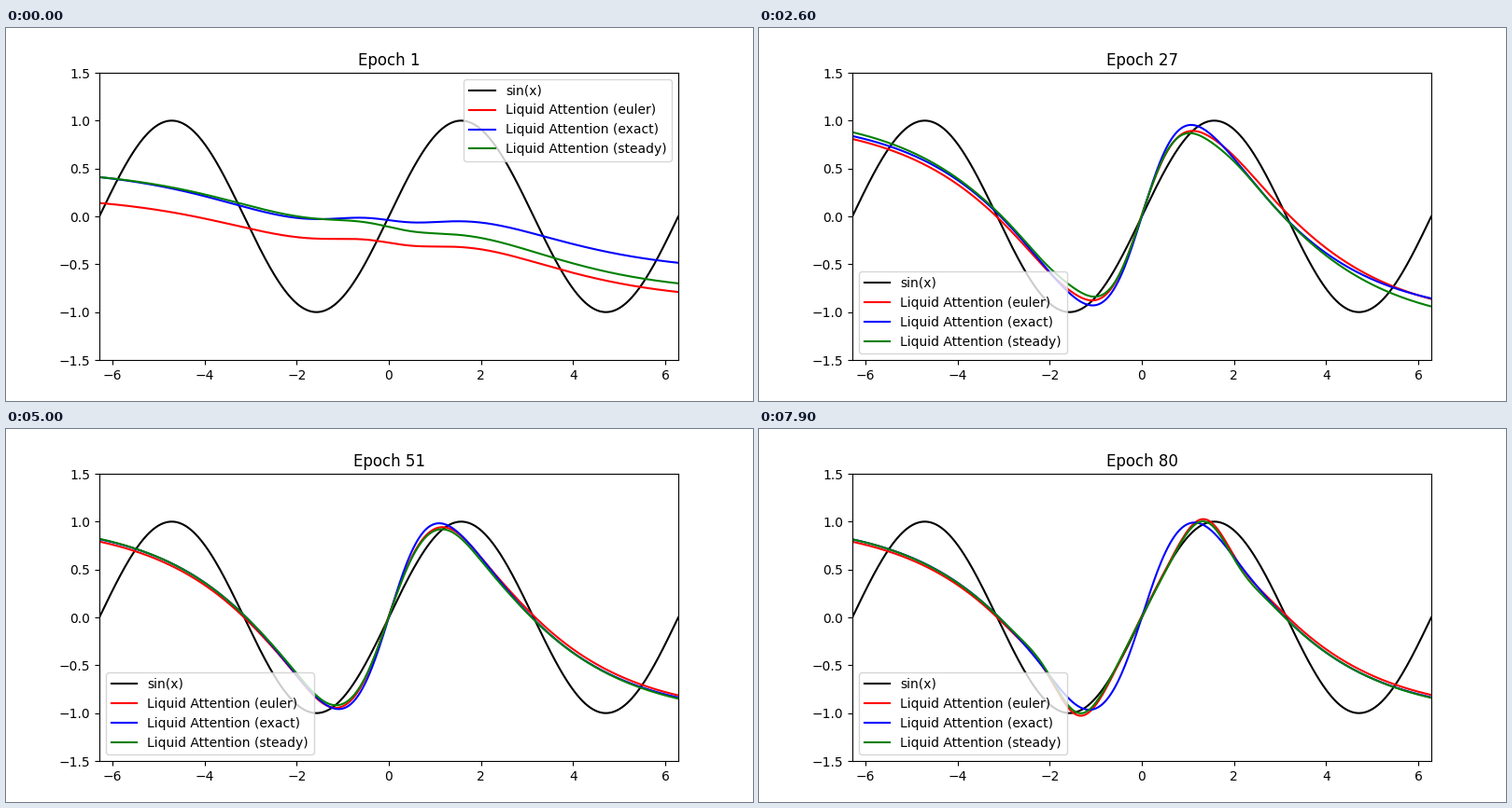
These frames come from a looping animation (800 px wide and 400 px high, 8 s). A matplotlib script:

```python
import numpy as np
import matplotlib.pyplot as plt
from matplotlib.animation import FuncAnimation

FRAMES, INTERVAL = 80, 100
LEGEND_SWITCH = 5
WARMUP = 16            # frames until the wave shape has formed
SETTLE = 10            # decay constant of the fine tuning afterwards
RATES = (1, .5, .28)   # steepness of the tanh terms on each side of zero
ANCHORS = np.array([-2 * np.pi, -np.pi, -1.1, 0, 1.1, np.pi, 2 * np.pi])

# Per curve: heights at the anchors at the start, after warm-up and at the end,
# then the peak sharpness after warm-up and the bend towards the sine at the end
MODELS = {
    "euler": ("red",
              [.14, -.115, -.235, -.275, -.315, -.475, -.79],
              [.84, -.02, -.77, .02, .82, .075, -.955],
              [.79, 0, -.945, .02, .94, .015, -.81], -.06, .18),
    "exact": ("blue",
              [.41, .10, -.022, -.04, -.057, -.18, -.485],
              [.88, .06, -.88, 0, .905, -.06, -.895],
              [.815, .02, -.96, 0, .985, -.015, -.835], -.02, .03),
    "steady": ("green",
               [.41, .125, -.038, -.11, -.18, -.37, -.70],
               [.99, .10, -.705, .02, .79, -.065, -1.115],
               [.815, .02, -.92, .01, .92, -.02, -.84], -.10, .18),
}


def terms(x):
    """A constant plus separate tanh terms for the left and right side."""
    sides = np.minimum(x, 0), np.maximum(x, 0)
    return np.column_stack([np.ones_like(x)]
                           + [np.tanh(r * s) for s in sides for r in RATES])


x = np.linspace(-2 * np.pi, 2 * np.pi, 500)
shape = terms(x) @ np.linalg.inv(terms(ANCHORS))
ripple = -np.sin(3 * x) * np.exp(-(x / 2.1) ** 4)


def curve(frame, start, warm, final, sharp, bend):
    """Learn quickly at first, settle exponentially, bend late."""
    rise = 1 - (1 - min(frame / WARMUP, 1)) ** 1.6
    rest = np.exp(-max(frame - WARMUP, 0) / SETTLE)
    start, warm, final = map(np.array, (start, warm, final))
    goal = final + (warm - final) * rest
    heights = start + (goal - start) * rise
    late = (frame / (FRAMES - 1)) ** 4
    return shape @ heights + ripple * (sharp * rise * rest + bend * late)


fig, ax = plt.subplots(figsize=(8, 4), dpi=100)
ax.plot(x, np.sin(x), color="black", label="sin(x)")
curves = []
for name, (color, *params) in MODELS.items():
    line, = ax.plot(x, curve(0, *params), color=color,
                    label=f"Liquid Attention ({name})")
    curves.append((line, params))
ax.set_xlim(-2 * np.pi, 2 * np.pi)
ax.set_ylim(-1.5, 1.5)
title = ax.set_title("Epoch 1")
legend = ax.legend(loc="upper right")


def update(frame):
    for line, params in curves:
        line.set_ydata(curve(frame, *params))
    title.set_text(f"Epoch {frame + 1}")
    legend.set_loc("upper right" if frame < LEGEND_SWITCH else "lower left")
    return [line for line, _ in curves] + [title, legend]


anim = FuncAnimation(fig, update, frames=FRAMES, interval=INTERVAL,
                     repeat=True, repeat_delay=0)
plt.show()
```
